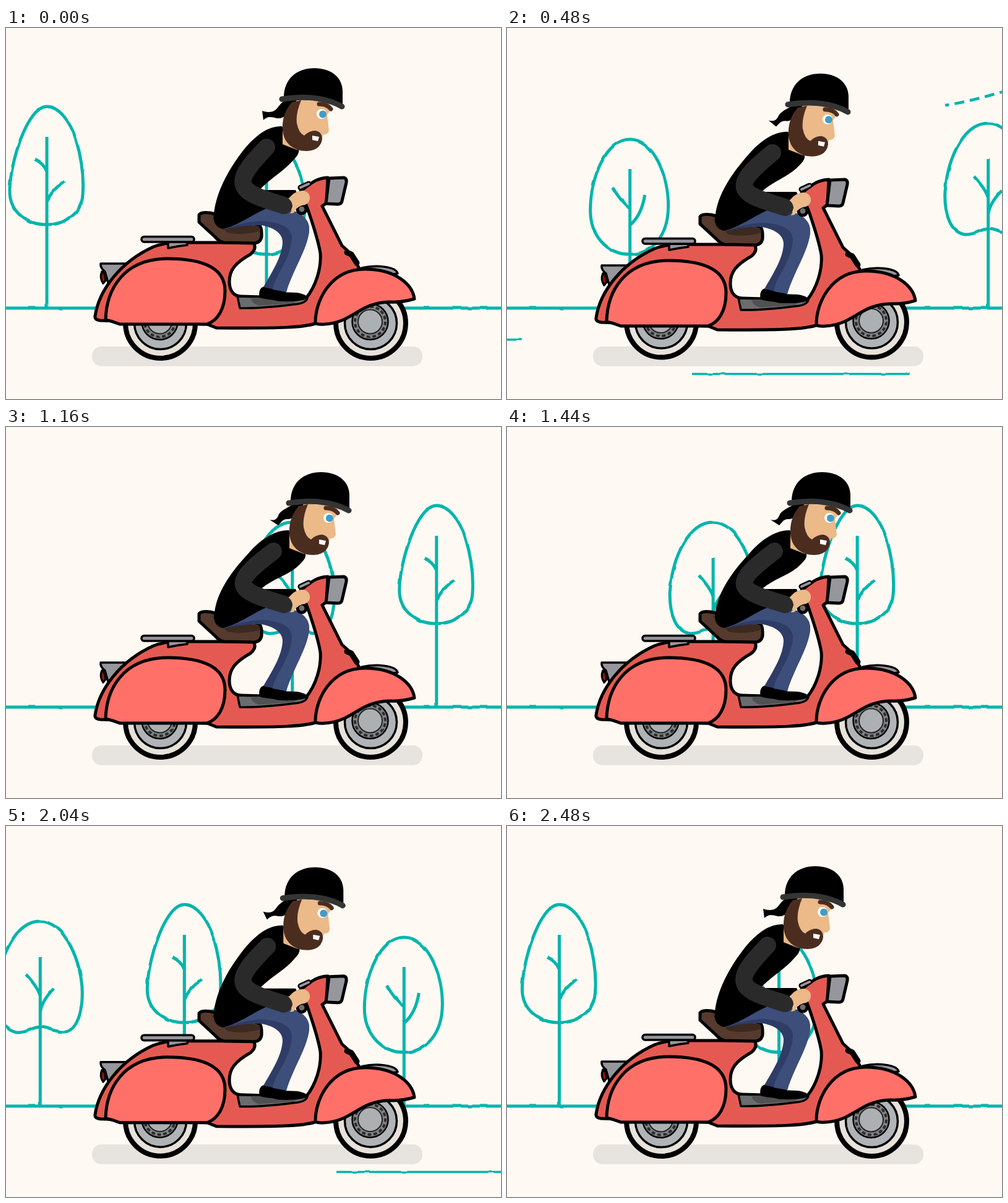
These frames come from a looping animation (800x600 px, 2520 ms). An HTML page:

```html
<!DOCTYPE html>
<html lang="en">
<head>
<meta charset="utf-8">
<title>Scooter ride</title>
<style>
html, body { margin: 0; width: 100%; height: 100%; overflow: hidden; background: #fff9f3; }
svg { display: block; width: 800px; height: 600px; }
.teal { fill: none; stroke: #00b5ad; stroke-width: 5; }
.thin { stroke-width: 3.5; }
.dash { stroke-width: 4.5; stroke-dasharray: 16 9; }
.ink { stroke: #000; stroke-width: 5; stroke-linejoin: round; stroke-linecap: round; }
.fine { stroke-width: 3.5; }
.bold { stroke-width: 9; fill: none; }
.trim { fill: none; stroke: #fff; stroke-width: 14; }
.skin { fill: #ecb988; }
.hair { fill: #4b2d20; }
.grey { fill: #96969d; }
.coral { fill: #ff7069; }
.red { fill: #e45a52; }
</style>
</head>
<body>
<svg viewBox="0 0 800 600">
  <defs>
    <filter id="rough" filterUnits="userSpaceOnUse" x="-100" y="0" width="1000" height="600" color-interpolation-filters="sRGB">
      <feTurbulence type="fractalNoise" baseFrequency=".05" numOctaves="1" seed="4"/>
      <feDisplacementMap in="SourceGraphic" scale="3" xChannelSelector="R" yChannelSelector="G"/>
    </filter>
    <mask id="m0" maskUnits="userSpaceOnUse" x="0" y="0" width="1000" height="200"><path class="trim"/></mask>
    <mask id="m1" maskUnits="userSpaceOnUse" x="0" y="0" width="1000" height="200"><path class="trim"/></mask>
    <g id="wheel">
      <circle r="56.5" fill="#e7e2da" stroke="#000" stroke-width="8"/>
      <circle r="42" fill="#b1b4b6" stroke="#000" stroke-width="3.5"/>
      <g transform="translate(-1 -2.5)">
        <circle r="29" fill="#808285" stroke="#000" stroke-width="2.5"/>
        <circle class="spin" r="24.5" fill="none" stroke="#2c2c2c" stroke-width="4" pathLength="160" stroke-dasharray="6 4"/>
        <circle r="19.5" fill="#adb0b2" stroke="#222" stroke-width="2"/>
      </g>
    </g>
  </defs>

  <path class="teal" filter="url(#rough)" d="M-5 453H805"/>
  <g class="tree"><path class="teal" filter="url(#rough)" d="M0 127C20 127 38 152 47 180C57 214 60 245 58 270C56 300 30 318 0 318C-32 318 -60 298 -60 264C-60 220 -32 127 0 127M0 176V453M-20 212Q-5 219 0 232M28 248Q6 264 1 280"/></g>
  <g class="tree"><path class="teal" filter="url(#rough)" d="M0 180C38 180 62 238 62 288C62 335 36 366 0 366C-38 366 -64 335 -64 295C-64 240 -38 180 0 180M0 228V453M-28 258Q-12 284 0 292M24 270Q19 302 1 318"/></g>
  <g class="tree"><path class="teal" filter="url(#rough)" d="M0 154C40 154 68 222 68 270C68 310 55 333 38 333C22 333 14 325 0 325C-14 325 -20 335 -38 334C-60 330 -70 305 -70 270C-67 212 -40 154 0 154M0 212V453M-23 240Q-3 262 0 275M22 263Q2 283 0 302"/></g>
  <g class="gust"><path class="teal dash" mask="url(#m0)" d="M930 60C860 84 780 114 708 125"/></g>
  <g class="gust"><path class="teal dash" mask="url(#m1)" d="M355 70C310 98 270 111 228 111C180 109 128 90 128 52C128 25 155 13 172 15C192 17 198 35 194 50C190 65 178 78 167 82"/></g>
  <g class="road"><path class="teal thin" filter="url(#rough)" d="M0 504H352"/></g>
  <g class="road"><path class="teal thin" filter="url(#rough)" d="M0 559.5H352"/></g>
  <g class="road"><path class="teal thin" filter="url(#rough)" d="M0 559.5H352"/></g>

  <rect x="139" y="515" width="534" height="32" rx="15" fill="#e7e4df"/>
  <g id="wheels">
    <use href="#wheel" x="249.5" y="477.5"/>
    <use href="#wheel" x="589.5" y="477.5"/>
  </g>

  <g id="ride">
    <path class="ink grey fine" d="M153 381H200L165 412L160 394Q152 388 153 381Z"/>
    <path class="ink fine" fill="#a81410" d="M155 394Q151 404 157 413L161 408L159 397Z"/>
    <path class="ink red" d="M144 466C150 424 185 378 238 354Q255 347 280 347L400 347Q406 357 395 366C370 380 361 392 361 410C361 425 368 434 380 434L485 437C501 417 510 388 508 364C504 340 494 312 488 294L476 264C492 252 500 243 520 242L518 283L511 288L543 352L553 361L572 390L540 430L500 478C480 484 450 486 340 485L325 479L152 473Q143 472 144 466Z"/>
    <path class="ink coral" d="M161 472C162 425 188 374 260 373C330 373 354 395 354 425C354 455 342 473 325 479H184Q172 474 161 472Z"/>
    <path class="ink grey fine" d="M262 346V356L278 353L293 351V346Z"/>
    <rect class="ink grey fine" x="219" y="337.5" width="85" height="8.5" rx="4"/>
    <path class="ink fine" fill="#6b6c6e" d="M374 434L487 437Q484 446 465 447Q410 454 378 453Z"/>
    <path fill="#505153" d="M396 436H480L464 445L410 449Q396 446 396 436Z"/>
    <path class="ink bold" d="M551 363L558 366L567 380"/>
    <path class="ink grey fine" d="M575 388C597 383 630 385 633 397L620 399Z"/>
    <path class="ink coral" d="M500 476C500 440 525 390 580 390C630 390 657 415 660 438Q640 444 620 443C570 444 560 477 515 479Q500 480 500 476Z"/>
    <path class="ink grey" d="M522 243L546 242Q551 243 550 250L543 280Q542 285 536 285L517 284Z"/>
    <path class="ink bold" d="M476 258L489 252"/>
    <path fill="none" stroke="#96969d" stroke-width="4" stroke-linecap="round" d="M476 258L489 252"/>
    <path class="ink" fill="#563a2e" d="M312 302Q316 297 330 299L408 318Q414 320 413 338Q411 348 400 348L352 347Q345 346 338 338L312 314Z"/>
    <path fill="#3c2920" d="M332 306L410 322L411 328Q385 336 358 331Z"/>
    <path d="M410 436C407 424 413 416 422 419L452 426L455 441Q420 440 410 436Z"/>
    <path fill="#2e3c66" d="M352 326C375 300 410 290 440 292C470 292 492 306 490 328C487 358 464 390 453 427L416 419C430 395 447 368 447 345C446 330 430 322 412 319Q380 318 352 326Z"/>
    <path fill="#3c4e79" d="M354 325C372 300 410 290 440 292C470 292 492 306 490 328C487 358 464 390 453 427L431 423C434 400 461 375 462 338C460 318 435 313 410 312C385 314 370 319 354 325Z"/>
    <path d="M428 432Q430 424 440 427L470 428Q488 431 487 437Q478 443 445 442Q425 441 428 432Z"/>
    <circle class="ink" cx="478" cy="293" r="7" fill="#6d6e70"/>
    <path d="M416 262H468L473 273L430 278Z"/>
    <path id="torso"/>
    <path id="sleeve" fill="none" stroke="#2b2a2a" stroke-width="28" stroke-linecap="round"/>
    <path class="skin" d="M459 300Q468 286 457 276Q466 263 481 263Q492 266 491 277Q489 286 478 287Q469 290 465 299Z"/>
    <g id="head">
      <path id="tails"/>
      <path class="skin" d="M470 116L522 120L524 134L519 140L522 166Q520 173 513 172L508 185L470 197L447 188V165Z"/>
      <path class="hair" d="M462 120L477 117Q468 138 470 154Q473 170 482 174Q490 166 500 166Q511 168 511 180Q508 198 486 199C464 199 449 186 447 165C446 145 452 132 462 120Z"/>
      <path fill="#fff" d="M495 174L506 176L504 183L495 181Z"/>
      <circle cx="510" cy="139" r="8" fill="#fff"/>
      <circle cx="512" cy="139.5" r="6" fill="#429cc6"/>
      <path fill="none" stroke="#4b2d20" stroke-width="7" stroke-linecap="round" d="M506 123Q519 123 525 131"/>
      <path d="M449 113C449 82 470 65 498 65C528 65 544 82 544 102V124C520 112 480 108 449 113Z"/>
      <path fill="none" stroke="#343434" stroke-width="9" stroke-linecap="round" d="M446 115Q505 106 543 127"/>
    </g>
  </g>
</svg>
<script>
const LOOP = 2520, STEP = 40, SPAN = 1167, SPEED = SPAN / LOOP, ROAD = 2.5;
const $ = id => document.getElementById(id);
const all = sel => [...document.querySelectorAll(sel)];
const move = (el, x, y = 0) => el.setAttribute('transform', `translate(${x} ${y})`);
const ramp = (t, a, b) => Math.min(1, Math.max(0, (t - a) / (b - a)));
const ease = u => (1 - Math.cos(Math.PI * u)) / 2;
const bump = (t, at, size) => size * Math.exp(-(((t - at) / 75) ** 2));

// Blend two paths that share the same commands.
function blend(a, b, p) {
  const to = b.match(/[\d.]+/g);
  let i = 0;
  return a.replace(/[\d.]+/g, n => +n + (to[i++] - n) * p);
}

const poses = {
  torso: ['M446 159C425 158 405 172 385 196C363 224 340 262 336 300C334 312 338 322 350 325C375 320 400 300 425 290L408 264C424 245 448 233 464 214C470 208 474 203 473 197Z',
          'M457 167C437 166 413 180 393 203C368 230 341 264 337 300C334 312 338 322 350 325C375 320 400 300 425 290L410 264C428 246 458 240 475 222C481 216 485 211 484 206Z'],
  sleeve: ['M421 193C400 215 378 238 384 254C390 272 430 280 449 287',
           'M432 201C410 218 380 240 384 256C390 272 430 280 449 287'],
  tails: ['M475 116L462 128C454 140 450 147 438 146C428 144 424 142 416 149L414 134C424 137 432 137 438 130C444 122 448 118 456 114Z',
          'M475 116L462 128C456 136 452 141 445 141C436 140 434 146 429 151L415 142C424 144 427 141 430 133C435 125 446 123 456 114Z']
};
const trees = all('.tree').map((el, i) => ({ el, x: [66, 421, 1000][i] }));
const roads = all('.road').map((el, i) => ({ el, ...[{ x: -328, at: 480 }, { x: 299, at: 480 }, { x: 534, at: 2040 }][i] }));
const spins = all('.spin');
const gusts = all('.gust').map((el, i) => {
  const path = el.firstElementChild, trim = $('m' + i).firstElementChild;
  trim.setAttribute('d', path.getAttribute('d'));
  return { el, trim, len: path.getTotalLength(),
    ...[{ at: 480, rise: .017, on: [300, 480], off: [500, 861] },
        { at: 1720, rise: 0, on: [1500, 1720], off: [1730, 1990] }][i] };
});

function draw(t) {
  for (const { el, x } of trees)
    move(el, (x - SPEED * t + 200 + SPAN) % SPAN - 200);
  for (const { el, x, at } of roads) move(el, x - ROAD * (t - at));
  for (const g of gusts) {
    const head = ramp(t, ...g.on) * g.len, tail = ramp(t, ...g.off) * g.len;
    g.el.style.display = head > tail ? '' : 'none';
    g.trim.setAttribute('stroke-dasharray', `0 ${tail} ${head - tail} ${g.len * 2}`);
    move(g.el, -SPEED * (t - g.at), -g.rise * (t - g.at));
  }

  const lean = ease(ramp(t, 0, 740)) - ease(ramp(t, 1430, 2215));
  for (const id in poses)
    $(id).setAttribute('d', blend(...poses[id], id === 'tails' ? Math.sqrt(Math.max(0, lean)) : lean));
  move($('head'), 11 * lean, 8 * lean);

  const dip = bump(t, 470, 3) + bump(t, 2060, .8);
  move($('ride'), 0, dip);
  move($('wheels'), 0, -dip / 2);
  for (const el of spins) el.setAttribute('transform', `rotate(${t / LOOP * 360 * 4})`);
}

function tick() {
  draw(Math.floor(performance.now() % LOOP / STEP) * STEP);
  requestAnimationFrame(tick);
}
tick();
</script>
</body>
</html>
```
